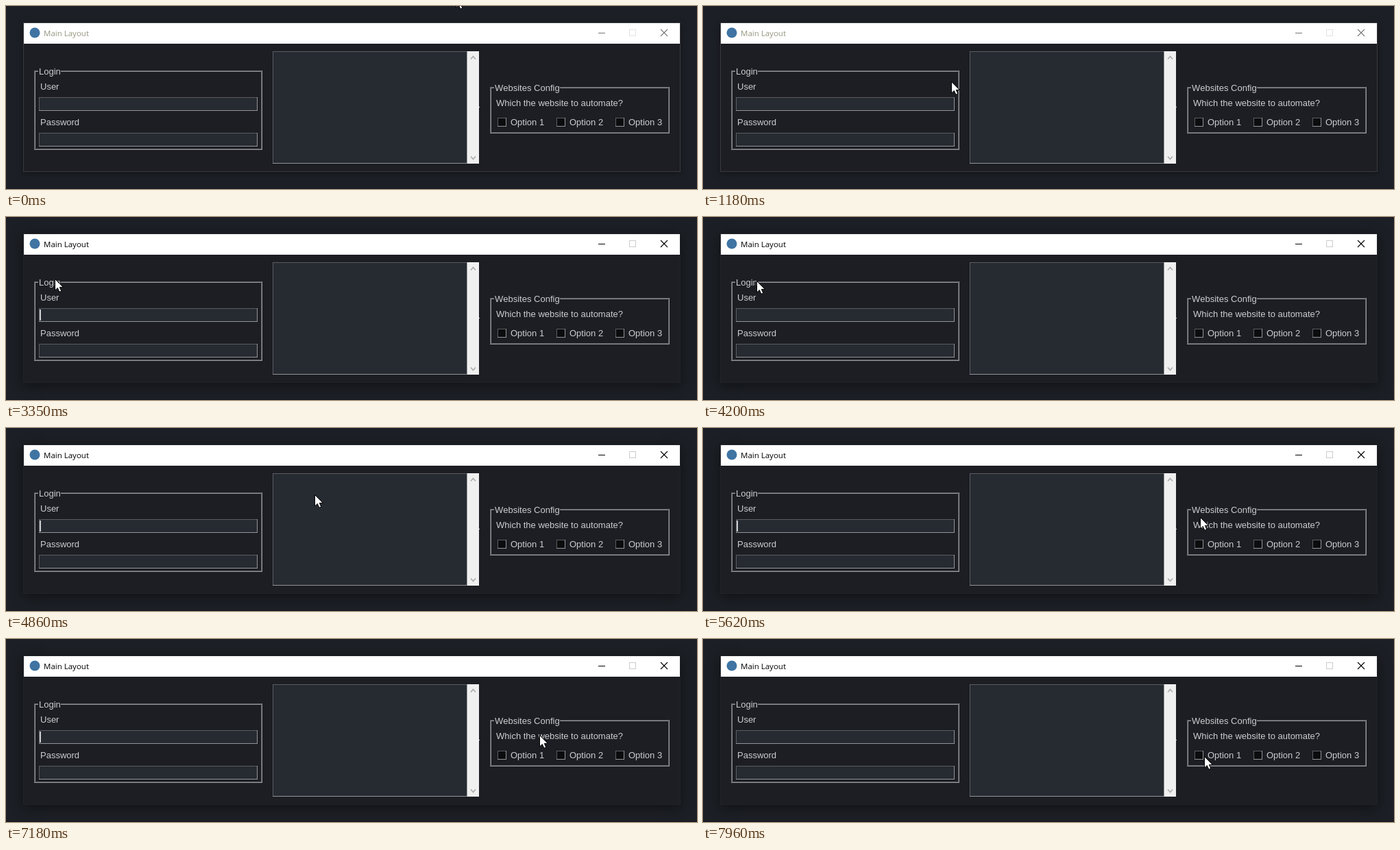
Recreate the animation shown at these times as an HTML page with a canvas. Size 1008 px wide and 267 px high, loop 8000 ms.

```html
<!DOCTYPE html>
<html lang="en">
<head>
<meta charset="utf-8">
<title>Main Layout</title>
<style>
  html, body { margin: 0; width: 100%; height: 100%; overflow: hidden; background: #1c1f25; }
  canvas { display: block; width: 1008px; height: 267px; }
</style>
</head>
<body>
<canvas id="stage" width="1008" height="267"></canvas>
<script>
const ctx = document.getElementById('stage').getContext('2d');
const LOOP = 8000;
const FOCUS_AT = 2900;
const BLINK = 1800, BLINK_ON = 1200;

const BG = '#1c1e23', FIELD = '#262b31', TEXT = '#cccdcf';
const SHADE = '#5b5d62', LIGHT = '#939498';
const UI = '13px "Liberation Sans", Arial, sans-serif';
const TITLE = '11.5px "Open Sans", "Noto Sans", sans-serif';

// Where the pointer turns or changes speed
const path = [
  { t: 250, x: 657, y: -14 },
  { t: 1040, x: 394, y: 99 },
  { t: 1180, x: 363, y: 111 },
  { t: 1870, x: 61, y: 78 },
  { t: 2350, x: 66, y: 87 },
  { t: 4200, x: 79, y: 94 },
  { t: 5160, x: 621, y: 101 },
  { t: 5620, x: 726, y: 131 },
  { t: 6230, x: 779, y: 112 },
  { t: 6610, x: 721, y: 130 },
  { t: 7080, x: 784, y: 134 },
  { t: 7590, x: 734, y: 193 },
  { t: 7960, x: 732, y: 172 }
];

const slope = (a, b, k) => (b[k] - a[k]) / (b.t - a.t);

// Tangent that never overshoots the key points
function tangent(i, k) {
  if (i === 0 || i === path.length - 1) return 0;
  const a = slope(path[i - 1], path[i], k);
  const b = slope(path[i], path[i + 1], k);
  return a * b <= 0 ? 0 : 2 * a * b / (a + b);
}

function pointer(time) {
  const last = path.length - 1;
  const t = Math.min(Math.max(time, path[0].t), path[last].t);
  let i = 0;
  while (i < last - 1 && t >= path[i + 1].t) i++;
  const p = path[i], q = path[i + 1];
  const d = q.t - p.t, u = (t - p.t) / d, v = 1 - u;
  return ['x', 'y'].map(k => Math.round(
    p[k] * (1 + 2 * u) * v * v + tangent(i, k) * d * u * v * v +
    q[k] * u * u * (3 - 2 * u) - tangent(i + 1, k) * d * u * u * v));
}

function rect(x, y, w, h, color) {
  ctx.fillStyle = color;
  ctx.fillRect(x, y, w, h);
}

function label(str, x, y, color = TEXT, font = UI) {
  ctx.font = font;
  ctx.fontKerning = 'none';
  ctx.fillStyle = color;
  ctx.fillText(str, x, y);
}

function line(points, color, width = 1) {
  ctx.beginPath();
  points.forEach(([x, y]) => ctx.lineTo(x, y));
  ctx.strokeStyle = color;
  ctx.lineWidth = width;
  ctx.stroke();
}

function bevel(x, y, w, h, topLeft, bottomRight) {
  rect(x, y, w, 1, topLeft);
  rect(x, y, 1, h, topLeft);
  rect(x, y + h - 1, w, 1, bottomRight);
  rect(x + w - 1, y, 1, h, bottomRight);
}

function sunken(x, y, w, h, fill) {
  rect(x, y, w, h, fill);
  bevel(x, y, w, h, SHADE, LIGHT);
}

function group(title, x, y, w, h, baseline) {
  bevel(x, y, w, h, SHADE, LIGHT);
  bevel(x + 1, y + 1, w - 2, h - 2, LIGHT, SHADE);
  ctx.font = UI;
  rect(x + 6, y, Math.ceil(ctx.measureText(title).width) + 1, 2, BG);
  label(title, x + 7, baseline);
}

function chevron(y, dir) {
  line([[678, y], [681.5, y + 4 * dir], [685, y]], '#acacac', 1.6);
}

function titleBar(focused) {
  const ink = focused ? '#000' : '#777';
  rect(26, 25, 957, 30, '#fff');
  ctx.beginPath();
  ctx.arc(42, 39, 7.5, 0, Math.PI * 2);
  ctx.fillStyle = '#3f74a3';
  ctx.fill();
  label('Main Layout', 55, 44, focused ? '#000' : '#95957f', TITLE);
  rect(864, 39, 10, 1, ink);
  ctx.strokeStyle = focused ? '#ccc' : '#e2e2e2';
  ctx.lineWidth = 1;
  ctx.strokeRect(909.5, 34.5, 9, 9);
  line([[955, 34], [965, 44]], ink, 1.1);
  line([[965, 34], [955, 44]], ink, 1.1);
}

function frame(focused) {
  rect(0, 0, 1008, 267, '#1c1f25');
  ctx.save();
  ctx.shadowColor = focused ? 'rgba(0,0,0,.45)' : 'rgba(0,0,0,.35)';
  ctx.shadowBlur = focused ? 18 : 9;
  ctx.shadowOffsetY = focused ? 4 : 2;
  rect(25, 24, 959, 218, focused ? '#202328' : '#383a3e');
  ctx.restore();
  rect(0, 266, 1008, 1, '#15171b');
  rect(26, 25, 957, 216, BG);
  titleBar(focused);
}

function content() {
  group('Login', 41, 94, 333, 116, 100);
  ['User', 'Password'].forEach((name, i) => {
    label(name, 50, 122 + i * 52);
    sunken(48, 133 + i * 52, 319, 20, FIELD);
  });

  sunken(389, 66, 284, 164, FIELD);
  rect(673, 66, 17, 164, '#f0f0f0');
  chevron(77.5, -1);
  chevron(219.5, 1);
  rect(690, 147, 1, 1, '#f0f0f0');

  group('Websites Config', 706, 118, 262, 68, 124);
  label('Which the website to automate?', 715, 146);
  for (let i = 0; i < 3; i++) {
    const x = 717 + i * 86;
    sunken(x, 163, 13, 13, '#0b0c0e');
    label('Option ' + (i + 1), x + 19, 174);
  }
}

function arrow(x, y) {
  const shape = [[0, 0], [0, 16.5], [3.8, 13], [6.4, 18.8], [9.3, 17.6], [6.8, 11.9], [11.8, 11.9]];
  ctx.beginPath();
  shape.forEach(([dx, dy]) => ctx.lineTo(x - 0.5 + dx, y - 0.5 + dy));
  ctx.closePath();
  ctx.fillStyle = '#fff';
  ctx.fill();
  ctx.strokeStyle = '#000';
  ctx.lineWidth = 1;
  ctx.stroke();
}

function draw(now) {
  const t = now % LOOP;
  const focused = t >= FOCUS_AT;
  frame(focused);
  content();
  if (focused && (t - FOCUS_AT) % BLINK < BLINK_ON) rect(49, 135, 2, 16, TEXT);
  arrow(...pointer(t));
  requestAnimationFrame(draw);
}

requestAnimationFrame(draw);
</script>
</body>
</html>
```
